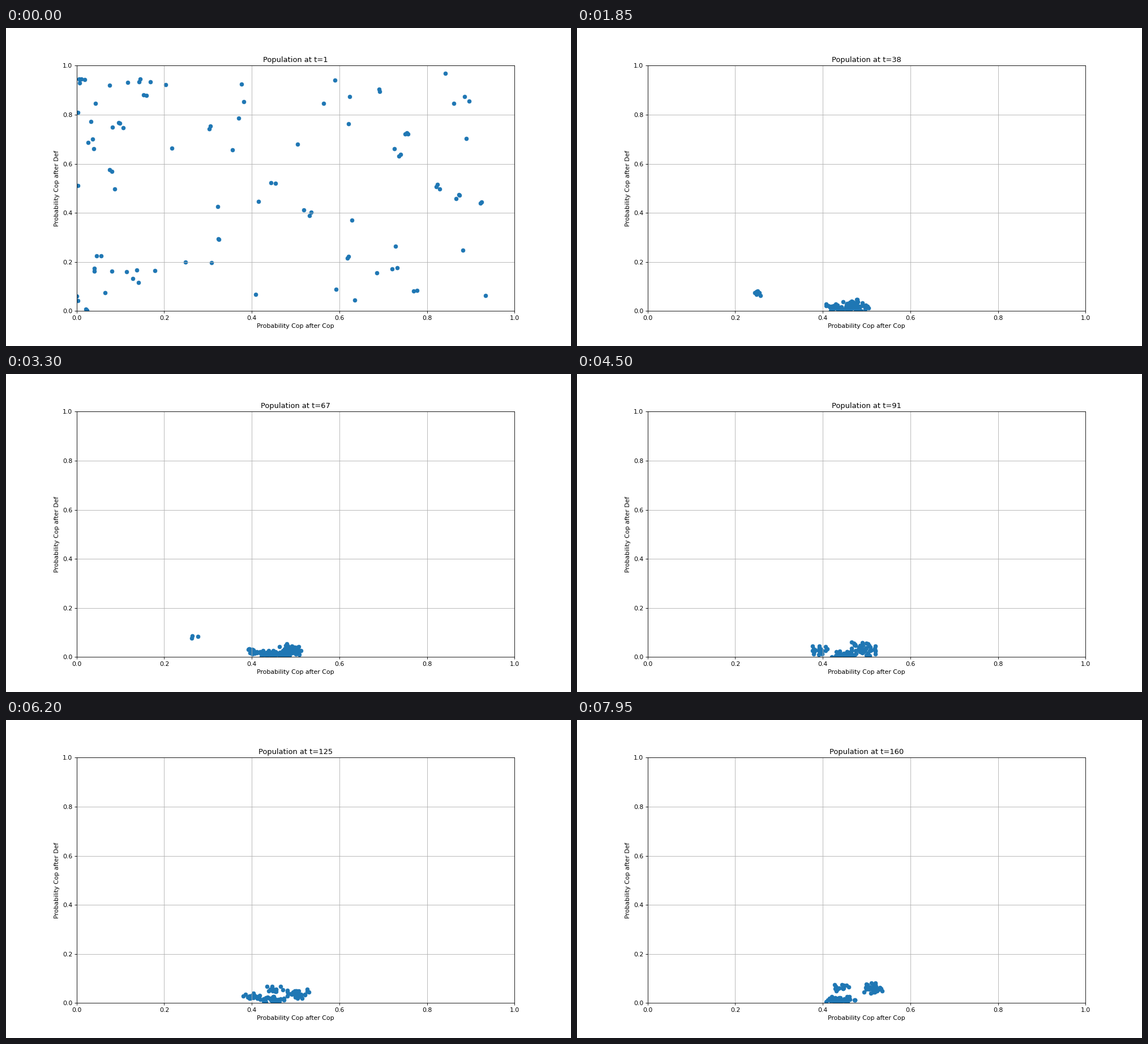
A matplotlib script for the animation above (8 s loop, 998x561 px).

```python
import numpy as np
import matplotlib.pyplot as plt
from matplotlib.animation import FuncAnimation

W, H, DPI = 998, 561, 78
STEPS, SIZE, FOUNDERS = 160, 100, 70
rng = np.random.default_rng(12)

# First generation: random strategies, some with siblings close by.
founders = rng.random((FOUNDERS, 2)) ** (1.3, 1.1)
siblings = founders[rng.integers(FOUNDERS, size=SIZE - FOUNDERS)]
first = np.vstack([founders, siblings]) + rng.normal(0, .006, (SIZE, 2))

# Cooperative strategies die out first.
score = first.sum(axis=1) + rng.normal(0, .12, SIZE)
rank = np.argsort(np.argsort(-score)) / (SIZE - 1)
life = 12 * rank ** 2
share = rng.permutation((np.arange(SIZE) + .5) / SIZE)

# Mutation: mean-reverting random walk for every individual.
walk = np.empty((STEPS, SIZE, 2))
walk[0] = rng.normal(size=(SIZE, 2))
for k in range(1, STEPS):
    walk[k] = .88 * walk[k - 1] + .475 * rng.normal(size=(SIZE, 2))
walk = np.clip(walk, -1.9, 1.9)

SPREAD = np.array([(.008, .007), (.010, .009), (.014, .008), (.011, .008), (.013, .011)])


def wave(t, peak):
    return np.cos(2 * np.pi * (t - peak) / 150)


def clusters(t):
    """Drifting centres and cumulative shares of the five clusters."""
    u = t / STEPS
    centres = np.array([
        (.222 + .096 * u, .077),                        # outpost that dies out
        (.410 + .020 * wave(t, 25), .020 - .008 * wave(t, 20)),
        (.447, .011),
        (.463 + .025 * wave(t, 75), .022 + .040 * u),
        (.468 + .048 * u, .016 + .044 * u ** 2.5),
    ])
    outpost = max(0, .15 * (1 - t / 87))
    shares = np.append(outpost, (1 - outpost) * np.array([.20, .32, .15, .33]))
    return centres, np.cumsum(shares)


def population(t):
    centres, shares = clusters(t)
    z = walk[t - 1]
    member = np.searchsorted(shares[:-1], share, side="right")
    pos = centres[member] + SPREAD[member] * z
    alive = t - 1 <= life
    pos[alive] = (first + .008 * (z - walk[0]))[alive]
    return np.clip(pos, 0, 1)


fig, ax = plt.subplots(figsize=((W + .01) / DPI, (H + .01) / DPI), dpi=DPI)
fig.subplots_adjust(left=.125, right=.9, bottom=.1102, top=.8816)
dots = ax.scatter(first[:, 0], first[:, 1])
ax.set(xlim=(0, 1), ylim=(0, 1),
       xlabel="Probability Cop after Cop", ylabel="Probability Cop after Def")
ax.grid(True)
title = ax.set_title("Population at t=1")


def update(i):
    dots.set_offsets(population(i + 1))
    title.set_text(f"Population at t={i + 1}")
    return dots, title


anim = FuncAnimation(fig, update, frames=STEPS, interval=50,
                     repeat=True, repeat_delay=0, blit=False)
plt.show()
```
